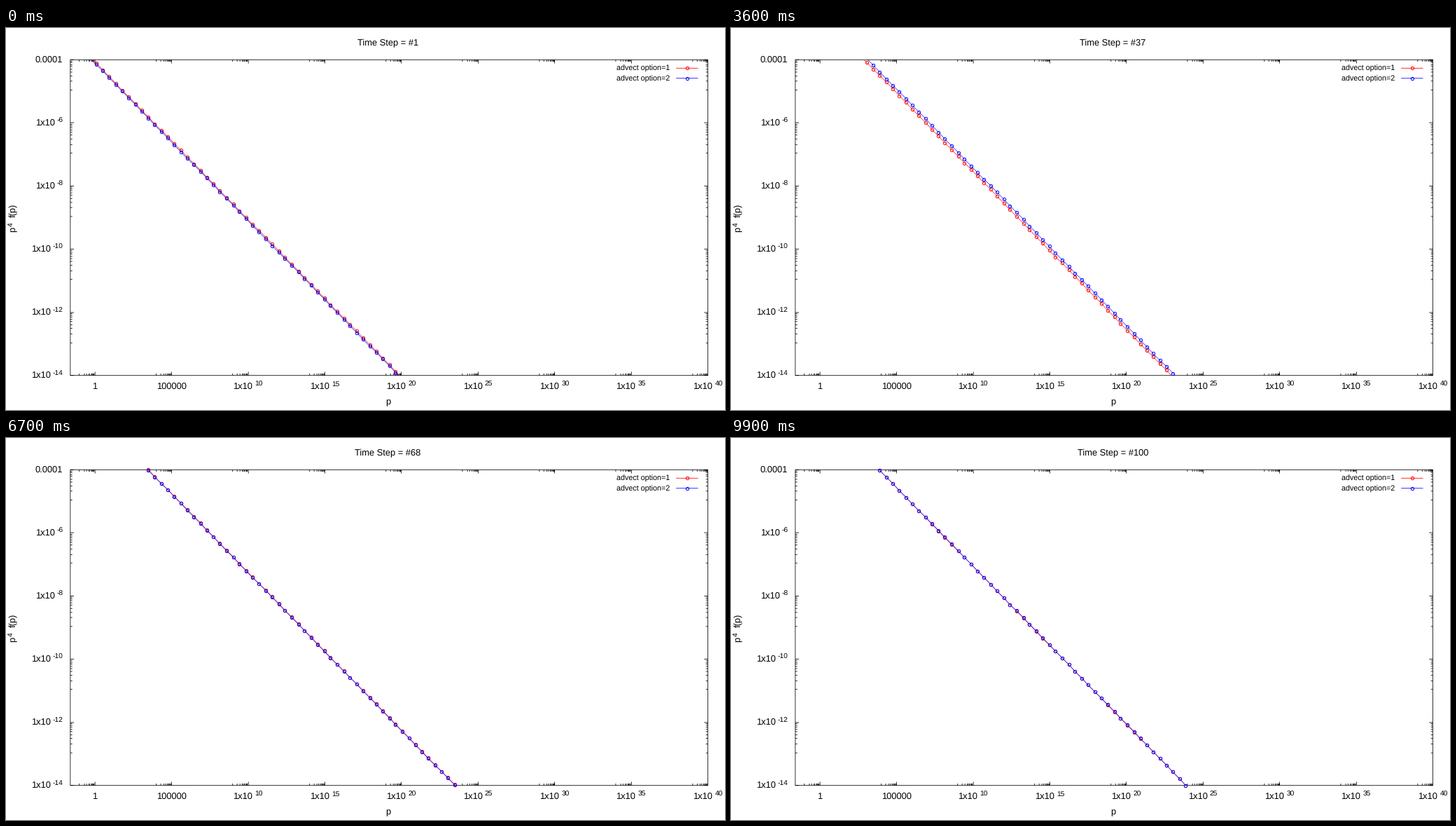
Write a matplotlib script that moves like this. It is 1027 px wide and 545 px high and loops after 10000 ms.

```python
import numpy as np
import matplotlib.pyplot as plt
from matplotlib.animation import FuncAnimation
from matplotlib.patches import Rectangle

W, H, DPI = 1027, 545, 64
GW, GH = 1280, 680                 # drawing grid, scaled down to the stage
PT = 72 / DPI * W / GW             # points per grid unit
LEFT, RIGHT, TOP, BOTTOM = 114.5, 1249.5, 56.5, 618.5
XONE = 158.2                       # grid column of p = 1
XDEC = (RIGHT - XONE) / 40         # grid units per decade
YDEC = (BOTTOM - TOP) / 10
SLOPE = 0.4993 * YDEC / XDEC       # the spectrum falls close to p^-1/2
FONT, SMALL, SUP = 16, 13.33, 12.8
RED, BLUE = "#ff0000", "#0000ff"

plt.rcParams["font.family"] = "Liberation Sans"
plt.rcParams["text.hinting"] = "none"
plt.rcParams["path.simplify"] = False

fig = plt.figure(figsize=(W / DPI, H / DPI), dpi=DPI, facecolor="white")
ax = fig.add_axes([0, 0, 1, 1])
ax.set_xlim(0, GW)
ax.set_ylim(GH, 0)
ax.axis("off")


def grid_x(dec):
    return XONE + dec * XDEC


def grid_y(dec):
    return TOP + (-4 - dec) * YDEC


def cell(v):
    return np.floor(v) + 0.5


def label(x, y, s, size=FONT, ha="left", rot=0):
    return ax.text(x, y, s, fontsize=size * PT, ha=ha, va="baseline",
                   rotation=rot, rotation_mode="anchor", color="black")


def line(x, y, color, width=1.0):
    return ax.plot(x, y, color=color, lw=width * PT, snap=False,
                   solid_capstyle="butt")[0]


def rings(x, y, color):
    return ax.plot(x, y, ls="none", marker="o", ms=5.4 * PT, mew=1.2 * PT,
                   mfc="none", mec=color, snap=False)[0]


def minors(lo, hi):
    """Nine places spread linearly between two log ticks."""
    first = 10.0 ** (lo - hi)
    return [hi + np.log10(first + (1 - first) * k / 10) for k in range(1, 10)]


def draw_frame():
    xs, ys = [], []

    def seg(x0, y0, x1, y1):
        xs.extend([x0, x1, np.nan])
        ys.extend([y0, y1, np.nan])

    def xtick(dec, size):
        x = cell(grid_x(dec))
        if LEFT < x < RIGHT:
            seg(x, TOP, x, TOP + size)
            seg(x, BOTTOM, x, BOTTOM - size)

    def ytick(dec, size):
        y = cell(grid_y(dec))
        seg(LEFT, y, LEFT + size, y)
        seg(RIGHT, y, RIGHT - size, y)

    for d in range(0, 41, 5):
        xtick(d, 6.5)
        for m in minors(d - 5, d):
            xtick(m, 3.5)
    for d in range(-14, -3, 2):
        ytick(d, 6.5)
        if d > -14:
            for m in minors(d - 2, d):
                ytick(m, 3.5)
    line(xs, ys, "black")
    line([LEFT, RIGHT, RIGHT, LEFT, LEFT],
         [TOP, TOP, BOTTOM, BOTTOM, TOP], "black")


def draw_labels():
    base = 2.168 * FONT            # advance of "1x10"
    label(grid_x(0), 642.5, "1", ha="center")
    label(grid_x(5), 642.5, "100000", ha="center")
    for d in range(10, 41, 5):
        x = grid_x(d) - 27
        label(x, 642.5, "1x10")
        label(x + base + 4.5, 637, str(d), SUP)

    label(100.5, grid_y(-4) + 4.4, "0.0001", ha="right")
    for d in range(-14, -5, 2):
        y = grid_y(d)
        wide = (0.333 + 0.556 * (len(str(d)) - 1)) * SUP
        label(101.6, y - 1.2, str(d), SUP, "right")
        label(101.6 - wide - 3.5, y + 4.4, "1x10", ha="right")

    label(680, 670, "p", ha="center")
    label(17, 363.5, "p", rot=90)
    label(12, 352.5, "4", SUP, rot=90)
    label(17, 337, "f(p)", rot=90)


def draw_key(y, text, color):
    label(1182, y + 4.4, text, SMALL, "right")
    line([1193, 1232], [y, y], color)
    rings([1212.5], [y], color)


class Curve:
    """A spectrum placed by where it crosses the top border."""
    x = cell(160.5 + 11.597 * np.arange(-6, 64))
    exact = 160.5 + 11.597 * np.arange(-6, 64)

    def __init__(self, color, steps, cross):
        self.steps = steps
        self.amp = 10 ** (np.array(cross) * SLOPE / YDEC)
        self.line = line([], [], color, 0.75)
        clip = Rectangle((LEFT, TOP), RIGHT - LEFT, BOTTOM - TOP,
                         transform=ax.transData)
        self.line.set_clip_path(clip)
        self.dots = rings([], [], color)

    def update(self, n):
        amp = np.interp(n, self.steps, self.amp)
        cross = np.log10(amp) * YDEC / SLOPE
        y = cell(TOP + (self.exact - cross) * SLOPE)
        inside = (y >= TOP) & (y <= BOTTOM)
        self.line.set_data(self.x, y)
        self.dots.set_data(self.x[inside], y[inside])


draw_frame()
draw_labels()
draw_key(71.5, "advect option=1", RED)
draw_key(89.5, "advect option=2", BLUE)
title = label(680, 31.5, "", ha="center")

STEPS = [1, 12, 15, 23, 34, 37, 45, 53, 68, 78, 88, 100]
curves = [
    Curve(RED, STEPS, [154.4, 196.3, 201.2, 215.4, 234.3, 237.2,
                       250.0, 253.1, 253.5, 259.1, 260.9, 263.5]),
    Curve(BLUE, STEPS, [152.2, 201.3, 206.0, 223.1, 240.6, 243.8,
                        250.3, 249.2, 252.6, 258.3, 260.0, 263.9]),
]


def update(i):
    title.set_text(f"Time Step = #{i + 1}")
    for c in curves:
        c.update(i + 1)
    return [title]


anim = FuncAnimation(fig, update, frames=100, interval=100,
                     repeat=True, repeat_delay=0, blit=False)
plt.show()
```
